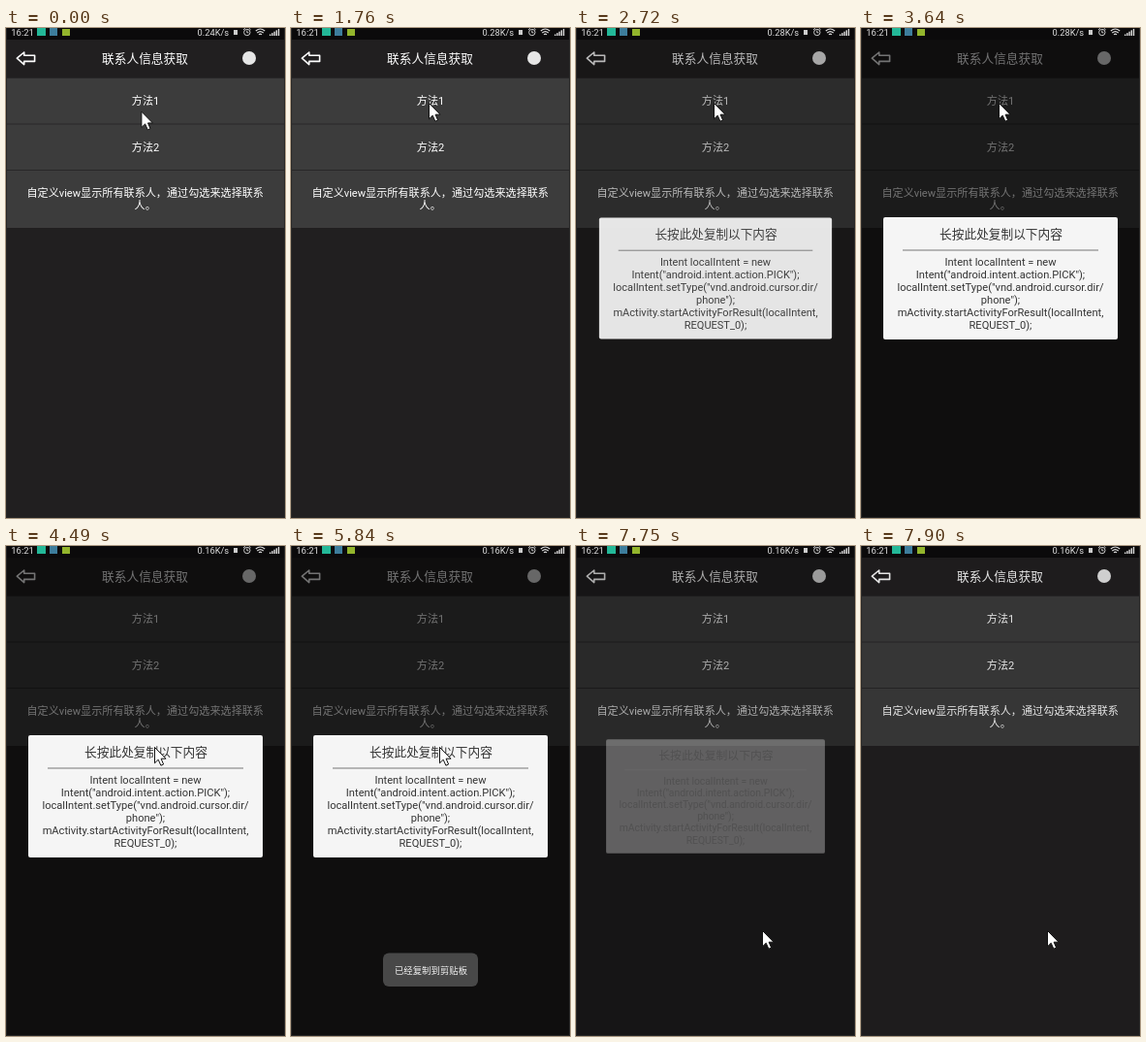
Animation, 288 px wide and 505 px high, one loop 8 s. Source, as an HTML page with a canvas:

```html
<!DOCTYPE html>
<html lang="zh-CN">
<head>
<meta charset="utf-8">
<style>
html, body { margin: 0; width: 288px; height: 505px; overflow: hidden; background: #000; }
canvas { display: block; }
</style>
</head>
<body>
<canvas id="stage" width="288" height="505"></canvas>
<script>
const LOOP = 8000;
const STEP = 136;
const LEAD = 36;
const FONT = 'Roboto, "Noto Sans CJK SC", "Noto Sans CJK JP", "Noto Sans CJK", sans-serif';
const CODE = [
  'Intent localIntent = new',
  'Intent("android.intent.action.PICK");',
  'localIntent.setType("vnd.android.cursor.dir/',
  'phone");',
  'mActivity.startActivityForResult(localIntent,',
  'REQUEST_0);'
];
const MOVES = [
  { from: 1360, to: 1768, x: 142, y: 77 },
  { from: 3808, to: 4488, x: 153, y: 207 },
  { from: 6528, to: 6936, x: 183, y: 408 },
  { from: 7208, to: 7480, x: 192, y: 396 }
];
const ctx = document.getElementById('stage').getContext('2d');

const ramp = (t, from, to) => Math.min(1, Math.max(0, (t - from) / (to - from)));
const easeOut = (p, power) => 1 - (1 - p) ** power;

function rect(x, y, w, h, color) {
  ctx.fillStyle = color;
  ctx.fillRect(x, y, w, h);
}

function text(str, x, y, size, color = '#fff', align = 'center') {
  ctx.font = `${size}px ${FONT}`;
  ctx.textAlign = align;
  ctx.fillStyle = color;
  ctx.fillText(str, x, y);
}

function box(x, y, w, h, r, color) {
  ctx.fillStyle = color;
  ctx.beginPath();
  ctx.roundRect(x, y, w, h, r);
  ctx.fill();
}

function line(d, width, color) {
  ctx.lineWidth = width;
  ctx.lineJoin = 'round';
  ctx.strokeStyle = color;
  ctx.stroke(new Path2D(d));
}

function drawPage() {
  rect(0, 0, 288, 505, '#211f20');
  line('M11.3 31.2L18.7 25V28.2H29.6V34.4H18.7V37.6Z', 1.6, '#fff');
  text('联系人信息获取', 143.5, 36, 12.7);
  box(244, 24, 14, 14, 7, '#e6e6e6');
  rect(0, 51, 288, 155, '#3c3c3c');
  for (const y of [51, 98.5, 146]) rect(0, y, 288, 1, '#282728');
  text('方法1', 144, 79.4, 11.1);
  text('方法2', 144, 127, 11.1);
  text('自定义view显示所有联系人，通过勾选来选择联系', 143.7, 174.3, 11.12);
  text('人。', 143.7, 187.3, 11.12);
}

function drawStatusBar(speed) {
  rect(0, 0, 288, 12, '#0b0a0b');
  text('16:21', 5.2, 8, 9.5, '#ddd', 'left');
  rect(32, 0, 9, 8, '#23b898');
  rect(45, 0, 8, 8, '#3d7d9c');
  rect(58, 1, 8, 7, '#93b52c');
  text(speed, 197.5, 8, 9.3, '#ddd', 'left');
  rect(235, 2, 4, 5, '#ccc');
  line('M245.6 4.5a3.2 3.2 0 1 0 6.4 0a3.2 3.2 0 1 0 -6.4 0M248.8 2.5V4.8H250.4M245 1.8L246.8 .3M252.6 1.8L250.8 .3', 1, '#ccc');
  line('M257.8 3Q262.5 -1 267.2 3M259.3 5Q262.5 2.3 265.7 5M261 6.8Q262.5 5.5 264 6.8', 1.1, '#ddd');
  for (let i = 0; i < 5; i++) rect(272 + i * 2.2, 6.5 - i * 1.4, 1.4, 1.5 + i * 1.4, '#ddd');
}

function drawDialog(open) {
  const scale = .9 + .1 * open;
  ctx.save();
  ctx.globalAlpha = open;
  ctx.translate(144, 258);
  ctx.scale(scale, scale);
  ctx.translate(-144, -258);
  box(23, 195, 242, 126, 2, '#f5f5f5');
  text('长按此处复制以下内容', 144.5, 217.2, 12.7, '#333');
  rect(43, 228.5, 202, 1, '#777');
  CODE.forEach((str, i) => text(str, 144, 245 + i * 13, 11.1, '#333'));
  ctx.restore();
}

function drawToast(alpha) {
  ctx.save();
  ctx.globalAlpha = alpha;
  box(95, 419.5, 98, 34.5, 6, '#484848');
  text('已经复制到剪贴板', 144.5, 440.6, 9.4, '#f4f4f4');
  ctx.restore();
}

function drawCursor(t) {
  let x = 139.4, y = 85.7;
  for (const move of MOVES) {
    const p = easeOut(ramp(t, move.from, move.to), 3);
    x += (move.x - x) * p;
    y += (move.y - y) * p;
  }
  const arrow = 'M.5 .5V16.8L4.2 13.2L6.9 19.2L9.6 18L7.1 12.2H12Z';
  ctx.save();
  ctx.translate(x, y);
  ctx.fillStyle = '#fff';
  ctx.fill(new Path2D(arrow));
  line(arrow, 1, '#111');
  ctx.restore();
}

function draw(now) {
  const t = Math.floor((now % LOOP + LEAD) / STEP) * STEP;
  const dim = .55 * (ramp(t, 2584, 2856) - ramp(t, 7616, 7950));
  const open = easeOut(ramp(t, 2530, 2790), 2) * (1 - ramp(t, 7616, 7820));
  const toast = ramp(t, 5304, 5848) - ramp(t, 7208, 7616);

  drawPage();
  rect(0, 12, 288, 493, `rgba(0,0,0,${dim})`);
  drawStatusBar(t < 272 ? '0.24K/s' : t < 4080 ? '0.28K/s' : '0.16K/s');
  ctx.lineWidth = 1;
  ctx.strokeStyle = '#262626';
  ctx.strokeRect(.5, -.5, 287, 505);
  drawDialog(open);
  drawToast(toast);
  drawCursor(t);
}

const start = performance.now();
function tick() {
  draw(performance.now() - start);
  requestAnimationFrame(tick);
}
tick();
</script>
</body>
</html>
```
